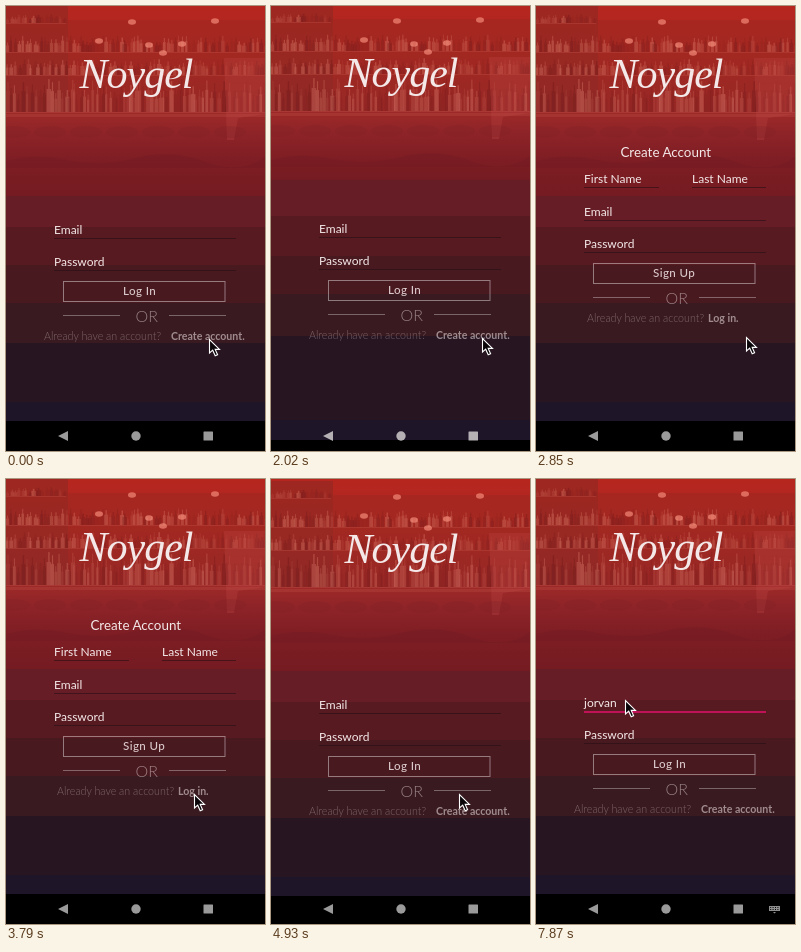
An HTML page that plays this animation: 259 by 445 pixels, repeating every 8000 ms.

```html
<!DOCTYPE html>
<html lang="en">
<head>
<meta charset="utf-8">
<title>Log in and sign up screens</title>
<style>
html, body { margin: 0; width: 100%; height: 100%; overflow: hidden; background: #000; }
svg { display: block; width: 100%; height: 100%; }
text { font-family: Lato, "Open Sans", sans-serif; fill: #f4e8e8; white-space: pre; }
.logo { font: italic 42px "Liberation Serif", serif; letter-spacing: -1px; }
</style>
</head>
<body>
<svg id="stage" viewBox="0 0 259 445"></svg>
<script>
const LOOP = 8000;
const svg = document.getElementById('stage');

let seed = 11;
const rnd = () => (seed = (seed * 16807) % 2147483647) / 2147483647;
const between = (a, b) => a + (b - a) * rnd();

const rect = (x, y, w, h, fill, extra = '') =>
  `<rect x="${x}" y="${y}" width="${w}" height="${h}" fill="${fill}" ${extra}/>`;
const text = (x, y, str, size = 12, extra = '') =>
  `<text x="${x}" y="${y}" font-size="${size}" ${extra}>${str}</text>`;
const rule = (x1, x2, y, color, alpha) =>
  rect(x1, y, x2 - x1, 1, color, `opacity="${alpha}"`);

// Smooth behind the photo, then flat bands that begin at the given heights
const bandColors = ['#671d25', '#571a21', '#491920', '#391a21', '#271521', '#1e1528'];
function backdrop(id, edges) {
  const stops = [[0, '#b6261f'], [55, '#ab2822'], [110, '#9b2828'], [130, '#8c2328'], [152, '#7f1e24'], [edges[0], '#741b21']];
  edges.forEach((y, i) => stops.push([y, bandColors[i]], [edges[i + 1] || 445, bandColors[i]]));
  const list = stops.map(([y, c]) => `<stop offset="${y / 445}" stop-color="${c}"/>`).join('');
  return `<linearGradient id="${id}" gradientUnits="userSpaceOnUse" x1="0" y1="0" x2="0" y2="445">${list}</linearGradient>`;
}

// Bar interior: shelves, bottles, lamps and the counter
function photo() {
  let s = rect(0, 0, 62, 106, '#7c2a25', 'opacity=".4"');
  s += rect(62, 14, 197, 92, '#8c2824', 'opacity=".3"');
  for (const [base, x0, x1, tall] of [[17, 0, 60, 9], [46, 0, 259, 17], [69, 0, 259, 16], [106, 0, 259, 33]]) {
    for (let x = x0; x < x1; x += between(2.2, 5)) {
      const h = between(tall * .5, tall), w = between(2, 4.5);
      const fill = rnd() < .55 ? '#e58a78' : '#6a181a';
      const look = `opacity="${between(.1, .36).toFixed(2)}"`;
      s += rect(x.toFixed(1), (base - h * .7).toFixed(1), w.toFixed(1), (h * .7).toFixed(1), fill, look);
      s += rect((x + w * .32).toFixed(1), (base - h).toFixed(1), (w * .36).toFixed(1), (h * .3).toFixed(1), fill, look);
    }
    s += rule(x0, x1, base, '#c85a4e', .3);
  }
  for (const [x, y] of [[93, 35], [143, 39], [157, 47], [209, 15], [176, 38], [126, 16]])
    s += `<ellipse cx="${x}" cy="${y}" rx="4" ry="2.8" fill="#ff9a86" opacity=".6"/>`;
  s += rect(0, 108, 259, 3, '#b84a42', 'opacity=".35"');
  s += '<path d="M218 52H259V108L232 112L228 134H221Z" fill="#c04a46" opacity=".28"/>';
  for (let x = 8; x < 259; x += 36)
    s += `<ellipse cx="${x}" cy="126" rx="16" ry="6" fill="#7d2025" opacity=".25"/>`;
  s += '<path d="M0 155Q30 147 62 154T130 152T200 156T259 151V162H0Z" fill="#6d1a21" opacity=".3"/>';
  return `<g filter="url(#blur)">${s}</g>`;
}

const logo = '<text class="logo" x="130" y="82" text-anchor="middle">Noygel</text>';
const underline = (x1, x2, y) => rule(x1, x2, Math.floor(y + 4.5), '#210d15', .55);
const field = (x, y, label, x2 = 230) => underline(x, x2, y) + text(x, y, label);
const button = (y, label) =>
  `<rect x="57.5" y="${y + .5}" width="161.5" height="20" fill="none" stroke="#fff" stroke-opacity=".42"/>` +
  text(117, y + 14, label, 11.6, 'font-weight="500" letter-spacing=".4" opacity=".85"');
const divider = y =>
  rule(57, 114, y, '#fff', .33) + rule(163, 220, y, '#fff', .33) +
  text(129.5, y + 6.5, 'OR', 16, 'font-weight="300" opacity=".5"');
const question = (x, y, x2, action) =>
  text(x, y, 'Already have an account?', 10.7, 'font-weight="300" opacity=".36"') +
  text(x2, y, action, 10.6, 'font-weight="700" opacity=".55"');

const login = logo + underline(48, 230, 227.5) + text(48, 227.5, 'Email', 12, 'id="entry"') +
  field(48, 260, 'Password') + button(275, 'Log In') + divider(309) +
  question(38, 334, 165, 'Create account.') +
  rect(48, 232, 182, 2, '#c01257', 'id="focus"') + rect(48, 217, 1.5, 13, '#d01a60', 'id="caret"');

const signup = logo + text(129.8, 150.5, 'Create Account', 13.4, 'text-anchor="middle"') +
  field(48, 177, 'First Name', 123) + field(156, 177, 'Last Name') +
  field(48, 209.7, 'Email') + field(48, 242.3, 'Password') +
  button(257, 'Sign Up') + divider(291) + question(51, 316, 172, 'Log in.');

const screen = (id, body) => `<g id="${id}Clip"><g id="${id}">
  ${rect(0, -20, 259, 467, 'url(#soft)', `id="${id}Bg"`)}<use href="#photo"/>${body}
  ${rect(0, 415, 259, 60, '#000', `id="${id}Bar"`)}</g></g>`;

function keyboard() {
  let s = rect(233, 427, 11, 5, '#8f8f8f');
  for (let i = 0; i < 8; i++)
    s += rect(234.2 + (i % 4) * 2.4, 428 + (i >> 2) * 2, 1, 1, '#000');
  return `<g id="keys">${s}<path d="M237 433H240L238.5 434.5Z" fill="#8f8f8f"/></g>`;
}

svg.innerHTML = `<defs>
  ${backdrop('soft', [190, 221, 259, 297, 337, 396])}
  ${backdrop('flat', [175, 211, 251, 289, 331, 415])}
  <filter id="blur"><feGaussianBlur stdDeviation=".45"/></filter>
  <g id="photo">${photo()}</g>
  <clipPath id="lower"><rect y="275" width="259" height="170"/></clipPath>
</defs>
${screen('signup', signup)}${screen('login', login)}
<g id="nav" fill="#9a9a9a"><path d="M52 430L62 425V435Z"/><circle cx="130" cy="430" r="4.7"/>
  <rect x="197.5" y="425.5" width="9.5" height="9" rx=".5"/></g>
${keyboard()}
<path id="pointer" d="M.5 .5V14L3.7 11.2L6.2 16.8L8.6 15.8L6.2 10.4H10.5Z" fill="#0a0508" stroke="#fff" stroke-width="1.1"/>`;

const el = {};
svg.querySelectorAll('[id]').forEach(n => el[n.id] = n);
const show = (node, on) => node.setAttribute('display', on ? 'inline' : 'none');

// Progress in n hard steps, the first at t0 and the last at t1
const steps = (t, t0, t1, n) =>
  t < t0 ? 0 : Math.min(1, (Math.floor((t - t0) / ((t1 - t0) / (n - 1)) + 1e-6) + 1) / n);
const ease = p => p * p * (3 - 2 * p);

// A new screen rises into place and slows down
function rise(t, start) {
  const d = Math.floor((t - start) / 60) * 60;
  return Math.round(17 * Math.exp(-d / 90));
}

function place(name, y, flat, barY = 415) {
  el[name].setAttribute('transform', `translate(0 ${y})`);
  el[name + 'Bg'].setAttribute('fill', `url(#${flat ? 'flat' : 'soft'})`);
  el[name + 'Bar'].setAttribute('y', barY);
}

function pointerAt(t) {
  const a = steps(t, 1250, 1480, 5);
  const b = ease(steps(t, 2850, 3310, 8));
  const c = ease(steps(t, 5110, 5590, 9));
  let x = 203 + 8 * a - 23 * b, y = 333 - a - 15 * b;
  if (t >= 3550) y--;
  if (t >= 3790) y--;
  return [Math.round(x + (89 - x) * c), Math.round(y + (221 - y) * c)];
}

const typing = [6430, 6550, 6730, 6910, 7150, 7390];
const user = 'jorvan';

function draw(t) {
  const leaving = t >= 2020 && t < 2080, tear = t >= 4750 && t < 4810;
  const onSignup = t >= 2080 && t < 4750;
  show(el.signupClip, onSignup || tear);
  show(el.loginClip, !onSignup);
  place('signup', tear ? -1 : onSignup ? rise(t, 2080) : 0, tear);
  place('login', leaving ? -1 : t >= 4750 ? rise(t, 4750) : 0, leaving || tear, leaving ? 435 : 415);
  if (tear) el.loginClip.setAttribute('clip-path', 'url(#lower)');
  else el.loginClip.removeAttribute('clip-path');
  el.nav.setAttribute('fill', leaving || tear ? '#b4b0b3' : '#9a9a9a');

  const typed = user.slice(0, typing.filter(k => t >= k).length);
  const label = typed || 'Email';
  if (el.entry.textContent !== label) el.entry.textContent = label;
  show(el.focus, t >= 5710);
  show(el.caret, t >= 5710 && t < 7870 && !(t >= 6310 && t < 6430));
  el.caret.setAttribute('x', typed ? 48.5 + el.entry.getComputedTextLength() : 48);
  show(el.keys, t >= 5890);
  el.pointer.setAttribute('transform', `translate(${pointerAt(t)})`);
}

function tick() {
  draw(performance.now() % LOOP);
  requestAnimationFrame(tick);
}
tick();
</script>
</body>
</html>
```
